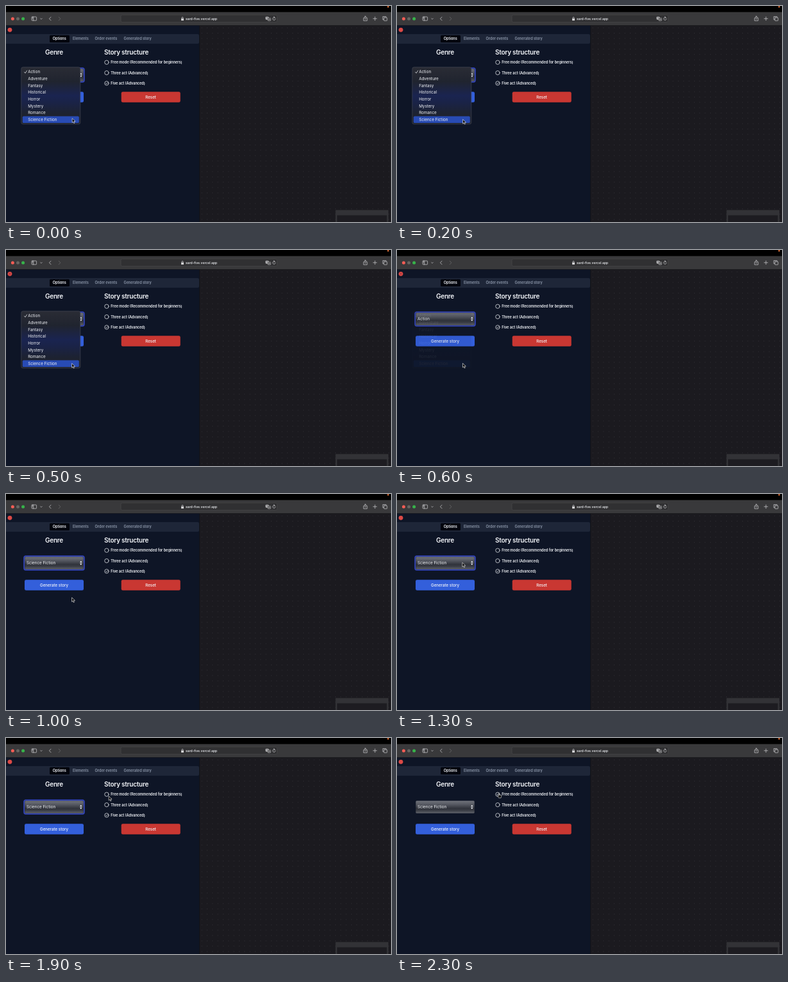
Recreate the animation shown at these times as an HTML page. Size 600x338 px, loop 2.5 s.

```html
<!DOCTYPE html>
<html lang="en">
<head>
<meta charset="utf-8">
<title>Story options</title>
<style>
html, body { margin: 0; width: 100%; height: 100%; overflow: hidden; background: #000; }
svg { display: block; width: 100%; height: 100%; }
text { font-family: Inter, "Open Sans", sans-serif; font-size: 5.65px; font-weight: 500; fill: #f4f6fa; }
.title { font-size: 10px; font-weight: 600; letter-spacing: -.025em; }
.label { font-weight: 600; font-size: 5.55px; }
.button { font-size: 6.2px; text-anchor: middle; }
.menu { font-size: 6.25px; font-weight: 400; }
.url { font-size: 5.1px; }
.icon { fill: none; stroke: #c9c9cb; stroke-width: .75; stroke-linecap: round; stroke-linejoin: round; }
.radio { fill: none; stroke: #f4f6fa; stroke-width: .7; stroke-linecap: round; stroke-linejoin: round; }
</style>
</head>
<body>
<svg viewBox="0 0 600 338">
  <defs>
    <pattern id="dots" x="301" y="30" width="8.33" height="8.33" patternUnits="userSpaceOnUse">
      <circle cx="4.2" cy="4.2" r=".5" fill="#3a393f"/>
    </pattern>
    <linearGradient id="selectFill" x2="0" y2="1">
      <stop offset="0" stop-color="#70737b"/>
      <stop offset=".3" stop-color="#555861"/>
      <stop offset=".62" stop-color="#30333b"/>
      <stop offset=".8" stop-color="#3d4048"/>
      <stop offset="1" stop-color="#63666e"/>
    </linearGradient>
    <linearGradient id="menuFill" x2="0" y2="1">
      <stop offset="0" stop-color="#2a2c35"/>
      <stop offset=".25" stop-color="#20242f"/>
      <stop offset=".5" stop-color="#1a2450"/>
      <stop offset=".62" stop-color="#1a2347"/>
      <stop offset=".82" stop-color="#1d2230"/>
      <stop offset="1" stop-color="#20232d"/>
    </linearGradient>
  </defs>

  <rect width="600" height="338" fill="#000"/>
  <circle cx="595.5" cy="1.2" r="1.2" fill="#e8743a"/>

  <rect y="9.5" width="600" height="21" fill="#39393b"/>
  <circle cx="10.4" cy="20" r="2.5" fill="#f45d55"/>
  <circle cx="18.5" cy="20" r="2.5" fill="#656562"/>
  <circle cx="26.6" cy="20" r="2.5" fill="#37b34a"/>
  <g class="icon">
    <rect x="40" y="17" width="7.6" height="5.8" rx="1"/>
    <path d="M42.7 17v5.8M41.1 18.5h.5M41.1 20h.5"/>
    <path d="M53.8 19.5l1.2 1.2 1.2-1.2"/>
    <path d="M70 17.2l-2.6 2.7 2.6 2.7"/>
    <path d="M82.2 17.2l2.6 2.7-2.6 2.7" stroke="#6c6c6e" style="stroke:#6c6c6e"/>
    <path d="M558.6 18.7h-1.4v4.3h5.6v-4.3h-1.4M560 21v-5M558.5 17.3l1.5-1.5 1.5 1.5"/>
    <path d="M572.2 19.8h5.6M575 17v5.6"/>
    <path d="M588.7 21.3h-1.5v-4.8h5v1.5"/>
    <rect x="588.9" y="18.2" width="5" height="4.8" rx=".7"/>
  </g>
  <rect x="179" y="14" width="243.5" height="11.3" rx="2.2" fill="#303032" stroke="#4a4a4c" stroke-width=".6"/>
  <rect x="273" y="19.5" width="4" height="3.2" rx=".5" fill="#d8d8da"/>
  <path class="icon" d="M273.9 19.5v-1.1a1.1 1.1 0 0 1 2.2 0v1.1"/>
  <text class="url" x="280" y="21.9">sard-five.vercel.app</text>
  <rect x="404.6" y="16.8" width="4.6" height="4.4" rx=".8" fill="#c9c9cb"/>
  <path d="M405.7 18h2.4M406.9 17.5v.5M407.9 18l-2 2.1M406 18.3l1.9 1.8" fill="none" stroke="#39393b" stroke-width=".45"/>
  <rect x="407.9" y="18.8" width="4.6" height="4.2" rx=".8" fill="#303032" stroke="#c9c9cb" stroke-width=".6"/>
  <path class="icon" d="M409.2 22l1-2.2 1 2.2M419.4 18.4a2.2 2.2 0 1 0 .6 1.7M417.4 16.6l1.5 1.3-1.5 1.2"/>

  <rect y="30.5" width="301.5" height="307.5" fill="#0e1526"/>
  <rect x="301.5" y="30.5" width="298.5" height="307.5" fill="#1b1a1f"/>
  <rect x="301.5" y="30.5" width="298.5" height="307.5" fill="url(#dots)"/>
  <rect x="513.5" y="319.3" width="82.5" height="18.7" fill="#323236"/>
  <rect x="516" y="327.5" width="77.5" height="10.5" fill="#1d1c21"/>

  <circle cx="6" cy="37.3" r="3.4" fill="#dc4a46"/>
  <path id="cross" d="M4.3 35.6l3.4 3.4M7.7 35.6l-3.4 3.4" stroke="#802c35" stroke-width=".8"/>

  <path d="M0 44h298.5a2.5 2.5 0 0 1 2.5 2.5v10a2.5 2.5 0 0 1-2.5 2.5H0z" fill="#1e2638"/>
  <rect x="68" y="45.8" width="31" height="11.2" rx="1.6" fill="#03050d"/>
  <g id="tabs"></g>

  <text class="title" x="75" y="75.5" text-anchor="middle">Genre</text>
  <text class="title" x="153" y="75.5">Story structure</text>
  <g id="radios"></g>

  <rect id="ring" x="28.2" y="97.1" width="93.6" height="21.8" rx="2.6" fill="none" stroke="#3446bd" stroke-width="1.8"/>
  <rect x="29.3" y="98.2" width="91.4" height="19.6" rx="1.6" fill="url(#selectFill)"/>
  <text id="value" class="menu" x="32" y="110.1"></text>
  <path d="M115 107.2l1.8-2.5 1.8 2.5zM115 108.7l1.8 2.5 1.8-2.5z" fill="#f4f6fa"/>
  <rect x="29" y="134.2" width="92" height="16.6" rx="2.4" fill="#335fdb"/>
  <text class="button" x="75" y="144.8">Generate story</text>
  <rect x="179.7" y="134.2" width="92" height="16.6" rx="2.4" fill="#c93732"/>
  <text class="button" x="225.6" y="144.8">Reset</text>

  <g id="menu">
    <rect x="23.8" y="95.8" width="92" height="89" rx="2.6" fill="url(#menuFill)" stroke="#4a4e59" stroke-width=".6"/>
    <rect id="hover" x="25.8" y="172.6" width="88" height="10.5" rx="1.6" fill="#284bb4"/>
    <path class="radio" d="M28.6 103.4l1.4 1.7 2.6-4"/>
    <g id="items"></g>
  </g>

  <path id="arrow" d="M0 0v6.6l1.5-1.4 1.1 2.5 1.2-.5-1.1-2.5h2.2z" fill="#050505" stroke="#f2f2f2" stroke-width=".65" stroke-linejoin="round"/>
  <path id="hand" d="M-.7.6q.7-1 1.3 0v2.2q.6-.5 1.2.1.6-.4 1.1.2.8-.2.9.6v1.6q0 1-.7 2.1h-3.3q-.7-1.3-2-2.6.2-.9 1.5.1z" fill="#111" stroke="#f2f2f2" stroke-width=".6" stroke-linejoin="round"/>
</svg>
<script>
const LOOP = 2500, STEP = 100;
const $ = id => document.getElementById(id);
const genres = ['Action', 'Adventure', 'Fantasy', 'Historical', 'Horror', 'Mystery', 'Romance', 'Science Fiction'];
const modes = ['Free mode (Recommended for beginners)', 'Three act (Advanced)', 'Five act (Advanced)'];
const tabs = [['Options', 72.8], ['Elements', 104], ['Order events', 138.6], ['Generated story', 183.5]];

// pointer positions: time, x, y
const path = [
  [0, 103.2, 175.8], [100, 103, 176.5], [200, 102.6, 177.4], [600, 102.4, 177.2],
  [800, 102.6, 172], [1000, 102.6, 162], [1100, 102.4, 141], [1200, 102, 118], [1300, 101.8, 107.3],
  [1500, 104, 106.8], [1600, 114, 104.6], [1700, 131, 100], [1800, 149, 94.6], [1900, 160.2, 91],
  [2000, 158.8, 86.4]
];

$('tabs').innerHTML = tabs.map(([name, x], i) =>
  `<text class="label" x="${x}" y="53.4"${i ? ' style="fill:#8d98ab"' : ''}>${name}</text>`).join('');

$('radios').innerHTML = modes.map((name, i) => {
  const y = 88.2 + i * 16.35;
  return `<circle class="radio" cx="156.9" cy="${y}" r="3.2"/>
    <path class="radio" id="check${i}" d="M155.4 ${y + .1}l1.1 1.1 2-2.3"/>
    <text class="label" x="163.2" y="${y + 2}">${name}</text>`;
}).join('');

$('items').innerHTML = genres.map((name, i) =>
  `<text class="menu" x="34.2" y="${105.3 + i * 10.67}">${name}</text>`).join('');

const fade = (id, value) => $(id).setAttribute('opacity', value);
const between = (t, from, to) => t >= from && t < to ? 1 : 0;

function draw(time) {
  const t = Math.floor(time / STEP) * STEP;
  const [, x, y] = path.filter(p => p[0] <= t).pop();
  const pointing = t >= 2000;
  const free = t >= 2100;

  fade('menu', t < 600 ? 1 : t < 700 ? .07 : 0);
  fade('hover', 1 - between(t, 400, 500));
  fade('cross', between(t, 400, 700) * .8);
  fade('ring', Math.max(0, Math.min(1, (2300 - t) / 300)));
  fade('check0', free ? 1 : 0);
  fade('check1', 0);
  fade('check2', free ? 0 : 1);
  $('value').textContent = t < 700 ? genres[0] : genres[7];

  for (const id of ['arrow', 'hand']) $(id).setAttribute('transform', `translate(${x} ${y})`);
  fade('arrow', pointing ? 0 : 1);
  fade('hand', pointing ? 1 : 0);
}

function tick() {
  draw(performance.now() % LOOP);
  requestAnimationFrame(tick);
}
tick();
</script>
</body>
</html>
```
